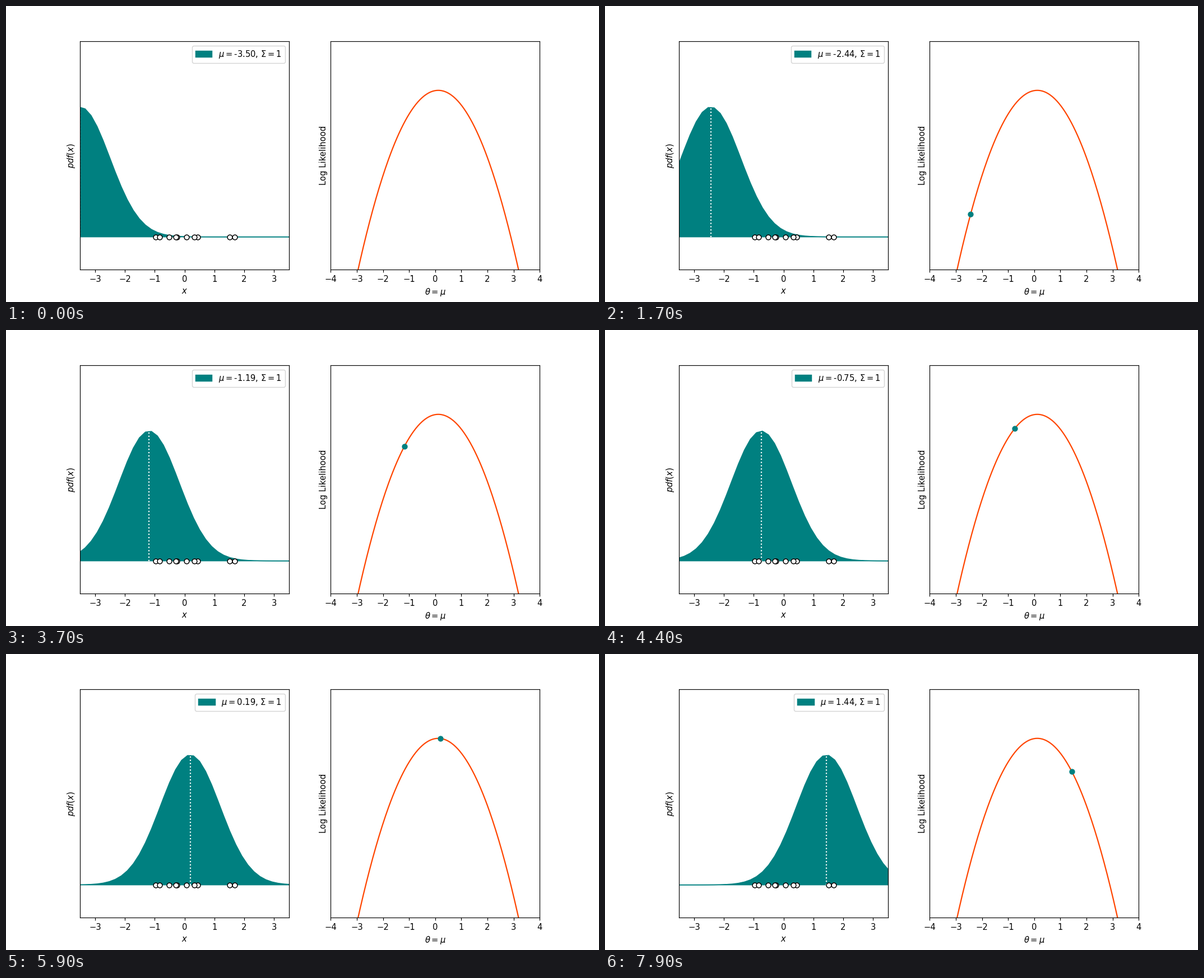
A matplotlib script that plays this animation: 1058x529 px, repeating every 8 s.

```python
import numpy as np
import matplotlib.pyplot as plt
from matplotlib.animation import FuncAnimation

FRAMES, INTERVAL = 80, 100
MU_START, MU_STEP = -3.5, 1 / 16

samples = np.array([-0.965, -0.84, -0.51, -0.25, -0.295,
                    0.055, 0.445, 0.335, 1.515, 1.675])
grid = np.linspace(-10, 10, 100)


def pdf(x, mu):
    return np.exp(-0.5 * (x - mu) ** 2) / np.sqrt(2 * np.pi)


def log_likelihood(mu):
    return np.log(pdf(samples, mu)).sum()


fig, (left, right) = plt.subplots(1, 2, figsize=(10, 5), dpi=105.8)

left.set(xlim=(-3.5, 3.5), ylim=(-0.1, 0.6), yticks=[],
         xlabel="$x$", ylabel="$pdf(x)$")
left.set_xticks(range(-3, 4))
mean_line, = left.plot([], [], ":", color="white")
left.plot(samples, np.zeros_like(samples), "o", mfc="white", mec="black")

right.set(xlim=(-4, 4), ylim=(-60, 0), yticks=[],
          xlabel=r"$\theta=\mu$", ylabel="Log Likelihood")
right.set_xticks(range(-4, 5))
theta = np.linspace(-4, 4, 200)
right.plot(theta, [log_likelihood(t) for t in theta], color="orangered")
dot, = right.plot([], [], "o", color="teal")


def update(i):
    mu = MU_START + MU_STEP * i
    for area in list(left.collections):
        area.remove()
    left.fill_between(grid, pdf(grid, mu), color="teal",
                      label=rf"$\mu=${mu:.2f}, $\Sigma=1$")
    left.legend(loc="upper right")
    mean_line.set_data([mu, mu], [0, pdf(mu, mu)])
    dot.set_data([mu], [log_likelihood(mu)])
    return mean_line, dot


anim = FuncAnimation(fig, update, frames=FRAMES, interval=INTERVAL,
                     init_func=lambda: update(0), repeat=True, repeat_delay=0)
plt.show()
```
